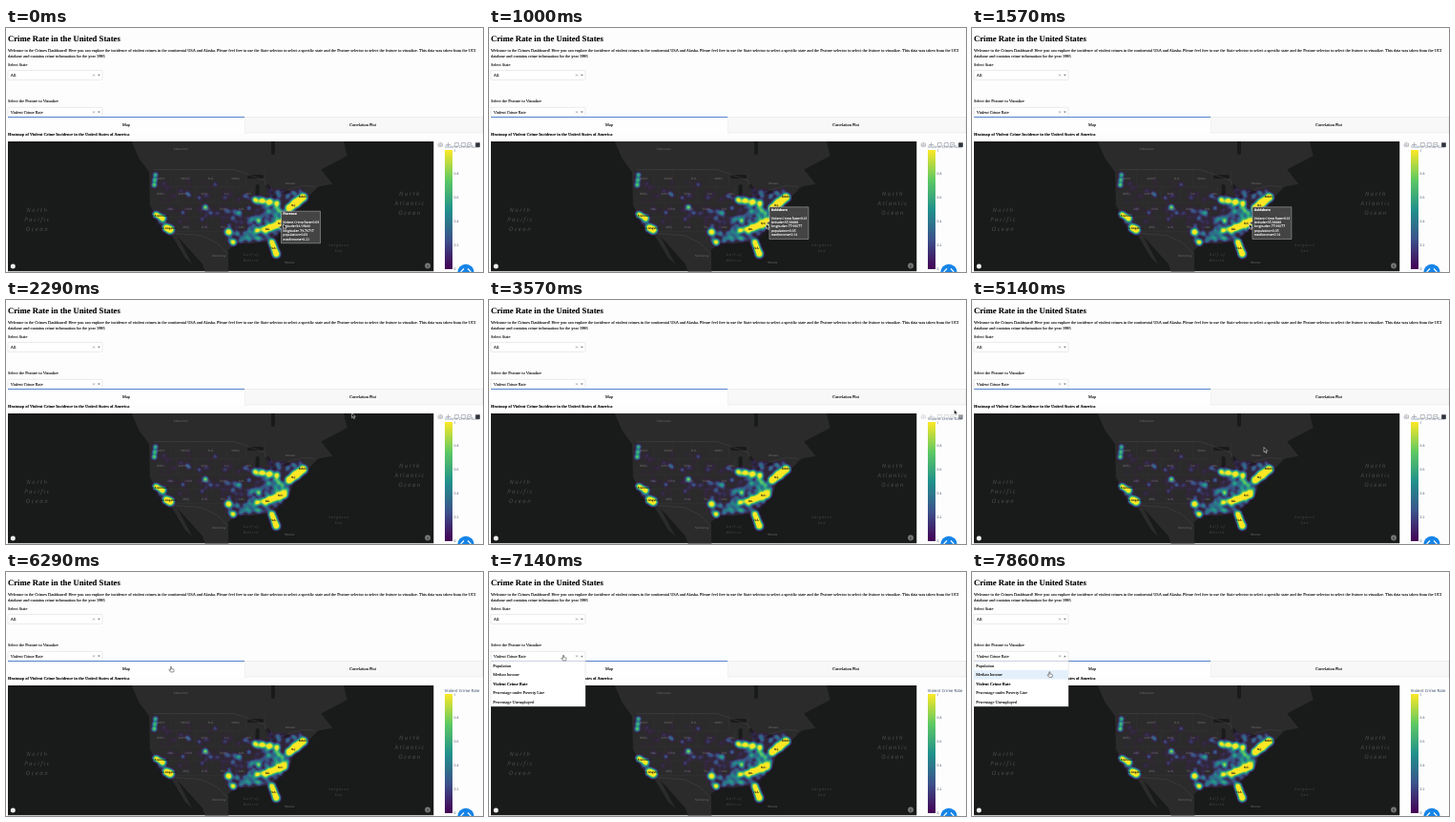
An HTML page for the animation above (8 s loop, 500 by 256 pixels).

```html
<!DOCTYPE html>
<html lang="en">
<head>
<meta charset="utf-8">
<title>Crime Rate in the United States</title>
<style>
html, body { margin: 0; width: 100%; height: 100%; overflow: hidden; background: #fdfdfd; }
svg { display: block; width: 100vw; height: 100vh; }
text { font: 4.37px "Liberation Serif", serif; fill: #000; stroke: #000; stroke-width: .08px; text-rendering: geometricPrecision; }
.b { font-weight: bold; }
.mid { text-anchor: middle; }
.plot text, .map text, .tip text { font-family: "Open Sans", sans-serif; font-size: 3.4px; stroke: none; }
.plot text { fill: #2a3f5f; }
.plot .title { font-size: 4.25px; }
.map text { font-size: 3px; fill: #777; text-anchor: middle; }
.map .sea, .map .gulf { font-style: italic; fill: #505050; }
.map .sea { font-size: 6px; letter-spacing: 1.5px; }
.map .gulf { font-size: 3.6px; letter-spacing: .9px; }
.map .hot { fill: #1a1a12; font-weight: bold; }
.tip text { fill: #fff; stroke: #fff; stroke-width: .12px; }
</style>
</head>
<body>
<svg id="stage" viewBox="0 0 500 256" preserveAspectRatio="none"></svg>
<script>
const LOOP = 8000, STEP = 1000 / 7;
const stage = document.getElementById('stage');
const mix = (a, b, u) => a + (b - a) * u;

let seed = 11;
const rnd = () => (seed = (seed * 16807) % 2147483647) / 2147483647;

// Mercator projection of the map view
const merc = lat => Math.log(Math.tan(Math.PI / 4 + lat * Math.PI / 360));
const proj = (lon, lat) => [303 + 3.03 * (lon + 74), 155 + (0.947 - merc(lat)) * 173.6];
const line = s => 'M' + s.split(' ').map(p => proj(...p.split(',').map(Number))).join('L');

const text = (x, y, s, cls = '', attr = '') => `<text x="${x}" y="${y}" class="${cls}" ${attr}>${s}</text>`;
const rect = (x, y, w, h, fill, attr = '') =>
  `<rect x="${x}" y="${y}" width="${w}" height="${h}" fill="${fill}" ${attr}/>`;
const stack = (x, y, gap, words, cls) => words.split(' ').map((s, i) => text(x, y + i * gap, s, cls)).join('');
const place = (lon, lat, s, cls) => {
  const [x, y] = proj(lon, lat);
  return text(x, y + 1, s, cls);
};
// names spread evenly along a parallel
const row = (lat, from, to, names) =>
  names.split(' ').map((s, i, all) => place(mix(from, to, i / (all.length - 1)), lat, s)).join('');

const LAND = line('-132,57 -128,51.5 -124.5,48.4 -124.2,40.3 -120.6,34.6 -117.1,32.5 -112,25 -109.6,23 -114.7,31.6 -106,23 -105,20 -97,20 -97.2,27.5 -94,29.5 -89.3,29.4 -84,30 -81,25.2 -81.4,31 -76,35.2 -74,40.5 -70,42 -66,45 -61,45.6 -65,49 -56,52 -58,57');
const LAKES = 'M255 156h13M263.6 178v-12M274 166l4 7M276 178l10-3M288 172h7M280 119v12';
const BORDER = line('-123,49 -95,49 -84.5,46.5 -82.5,42.5 -76,44.3 -71.3,45.2 -67,45') +
  line('-117.1,32.5 -106.5,31.8 -101,29.6 -97.2,26');

// a loose grid of state lines, offset from row to row
function states() {
  let d = '';
  for (let r = 0; r < 4; r++) {
    const top = 49 - r * 4, low = top - 4;
    d += line(`${-123 + r},${low} ${-92 + r * 3},${low}`);
    for (let lon = -117 + r * 2; lon < -82; lon += 6.5) d += line(`${lon},${top} ${lon},${low}`);
  }
  return d;
}

// populated corridors: two ends in lon, lat, then spots and radius
const CORRIDORS = [
  [-122.1, 37.8, -119.8, 36.7, 3, 2.8],
  [-118.5, 34.1, -117.2, 33.5, 3, 3.8],
  [-122.3, 47.8, -122.7, 45.4, 3, 1.7],
  [-105, 39.7, -105, 39.7, 1, 2.2],
  [-97, 32.8, -95.4, 29.8, 2, 3.2],
  [-87.8, 41.7, -80.3, 40.8, 4, 3],
  [-71.2, 42.3, -76, 39.5, 5, 4.2],
  [-78, 35.6, -84.5, 33.6, 5, 3.6],
  [-86.6, 36, -87, 33.3, 2, 2.3],
  [-82, 29.8, -80.5, 26.2, 4, 3.1]
];

function heat() {
  let out = '';
  const dot = (x, y, r, a) => out += `<circle cx="${x}" cy="${y}" r="${r}" opacity="${a}"/>`;
  for (let i = 0; i < 190; i++) {
    const u = rnd() ** .8, v = rnd() ** .85;
    const x = mix(228, 313 - 31 * v, u), y = 170 + (56 - 5 * u) * v;
    dot(x, y, 1.3 + rnd() * 1.3, .1 + .55 * rnd() * mix(.25, 1, (u + v) / 2));
  }
  for (let i = 0; i < 55; i++) dot(158 + rnd() * 70, 158 + rnd() * 54, 1.6, .1 + .5 * rnd() ** 4);
  for (const [lon1, lat1, lon2, lat2, n, r] of CORRIDORS)
    for (let i = 0; i < n; i++) {
      const u = i / Math.max(1, n - 1);
      dot(...proj(mix(lon1, lon2, u), mix(lat1, lat2, u)), r * (.9 + .35 * rnd()), 1);
    }
  return out;
}

const VIRIDIS = ['#440154', '#3b528b', '#21918c', '#5ec962', '#fde725'];
const channel = i => [...VIRIDIS, VIRIDIS[4]].map(c => parseInt(c.substr(1 + i * 2, 2), 16) / 255).join(' ');
const defs = `<defs>
  <filter id="viridis" filterUnits="userSpaceOnUse" x="130" y="120" width="210" height="136" color-interpolation-filters="sRGB">
    <feGaussianBlur stdDeviation="1.6"/>
    <feColorMatrix values="0 0 0 1 0  0 0 0 1 0  0 0 0 1 0  0 0 0 1 0"/>
    <feComponentTransfer>
      ${['R', 'G', 'B'].map((c, i) => `<feFunc${c} type="table" tableValues="${channel(i)}"/>`).join('')}
      <feFuncA type="table" tableValues="0 .9 1 1 1 1"/>
    </feComponentTransfer>
  </filter>
  <linearGradient id="scale" x1="0" y1="1" x2="0" y2="0">
    ${VIRIDIS.map((c, i) => `<stop offset="${i / 4}" stop-color="${c}"/>`).join('')}
  </linearGradient>
  <clipPath id="view">${rect(2, 119, 446.5, 136.5, '#000')}</clipPath>
</defs>`;

const select = (y, value) =>
  rect(2, y, 99, 10, '#fff', 'stroke="#ccc" stroke-width=".4" rx="1"') + text(4.8, y + 6.7, value) +
  `<path d="M91 ${y + 4}l2 2m0-2l-2 2" stroke="#777" stroke-width=".5"/>
   <path d="M96 ${y + 4.3}h2.8l-1.4 1.6z" fill="#777"/>`;

const page = rect(0, 0, 500, 256, '#fdfdfd') +
  text(2, 13.6, 'Crime Rate in the United States', 'b', 'style="font-size:8.68px"') +
  text(2, 25.4, 'Welcome to the Crimes Dashboard! Here you can explore the incidence of violent crimes in the continental USA and Alaska. Please feel free to use the State selector to select a specific state and the Feature selector to select the feature to visualize. This data was taken from the UCI') +
  text(2, 31.2, 'database and contains crime information for the year 1995') +
  text(2, 40, 'Select State') + select(44.5, 'All') +
  text(2, 78, 'Select the Feature to Visualize') + select(83.3, 'Violent Crime Rate') +
  rect(250, 93.6, 250, 16.4, '#f8f8f8', 'stroke="#d6d6d6" stroke-width=".4"') +
  rect(2, 93, 248, 17, '#fefefe') + rect(2, 93, 248, .9, '#4274c4') +
  text(126, 103.2, 'Map', 'mid') + text(374, 102.8, 'Correlation Plot', 'mid') +
  text(2, 113.4, 'Heatmap of Violent Crime Incidence in the United States of America', 'b');

const map = `<g class="map" clip-path="url(#view)">
  ${rect(2, 119, 446.5, 136.5, '#191a1a')}
  <path d="${LAND}Z" fill="#2b2b2b"/>
  <g fill="none"><path d="${states()}" stroke="#3a3a3a" stroke-width=".35"/>
  <path d="${LAKES}" stroke="#191a1a" stroke-width="4" stroke-linecap="round"/>
  <path d="${BORDER}" stroke="#505050" stroke-width=".4"/></g>
  <g filter="url(#viridis)">${heat()}</g>
  ${stack(33, 193, 10.2, 'North Pacific Ocean', 'sea')}
  ${stack(423.5, 175.7, 10.2, 'North Atlantic Ocean', 'sea')}
  ${text(257, 239, 'Gulf of', 'gulf') + text(257, 245, 'Mexico', 'gulf')}
  ${stack(349, 229, 6, 'Sargasso Sea', 'gulf')}
  ${row(47, -120.5, -94.5, 'WASH. MONT. N.D. MINN.')}
  ${row(43.3, -120.5, -90, 'OREG. IDAHO WYO. S.D. WIS.')}
  ${row(39.2, -117, -92.5, 'NEV. UTAH COLO. KANS. MO.')}
  ${row(34.3, -111.7, -92.5, 'ARIZ. N.M. TEX. ARK.')}
  ${place(-113.5, 53.5, 'Edmonton') + place(-75.7, 45.9, 'Ottawa') + place(-76, 23.4, 'Havana')}
  ${place(-100.3, 25.5, 'Monterrey') + place(-121.3, 37.5, 'San Francisco', 'hot') + place(-118, 33.9, 'Los Angeles', 'hot')}
  ${place(-71.3, 42.4, 'MASS.', 'hot') + place(-74.5, 40.2, 'N.J.', 'hot') + place(-79, 35.2, 'N.C.', 'hot')}
  ${place(-83.5, 33.6, 'GA.', 'hot') + place(-81.5, 28, 'FLA.', 'hot')}
  <circle cx="7.3" cy="250" r="2.5" fill="#eee"/>
  <circle cx="442" cy="249.5" r="2.9" fill="#777"/><path d="M442 248v.6m0 .7v2" stroke="#222" stroke-width=".8"/>
</g>`;

const legend = `<g class="plot">${rect(460, 128, 8, 125, 'url(#scale)')}
  ${text(459.8, 126, 'Violent Crime Rate', 'title')}
  ${[0, .2, .4, .6, .8, 1].map(v => text(469.6, 254 - v * 124.5, v)).join('')}</g>
  <circle cx="482" cy="256.3" r="8.6" fill="#1684e8"/>
  <path d="M480 252.5l-3 3 3 3m4-6l3 3-3 3" fill="none" stroke="#fff" stroke-width="1.1"/>`;

const box = x => `M${x} 120.5h4v4h-4z`;
const tools = `<g id="tools">${rect(452, 119.5, 46, 6.2, '#fff', 'opacity=".45"')}
  <g fill="none" stroke="#959aa2" stroke-width=".65">
    <path d="M453.2 121.2h1l.6-.8h1.2l.6.8h1v3h-4.4zM463.5 120v5m-2.5-2.5h5${[470.3, 477.3, 483.7].map(box).join('')}m.9 2h2.2"/>
    <circle cx="455.4" cy="122.7" r=".8"/>
  </g>${rect(492.2, 120.3, 4.6, 4.6, '#2f333b')}</g>`;

function tip(id, name, lat, lon, rate, population, income) {
  const [x, y] = proj(lon, lat);
  const rows = [name, '', `Violent Crime Rate=${rate}`, `latitude=${lat}`, `longitude=${lon}`, `population=${population}`, `medIncome=${income}`];
  return `<g id="${id}" class="tip" transform="translate(${x} ${y})">
    <path d="M0 0l3-1.6v-15.2h41v33.6h-41v-15.2z" fill="#444" stroke="#ddd" stroke-width=".4"/>
    ${rows.map((s, i) => text(4.8, -12.8 + i * 4.4, s, i ? '' : 'b')).join('')}</g>`;
}
const tips = tip('tipA', 'Florence', 34.19844, -79.76717, .69, .03, .22) +
  tip('tipB', 'Goldsboro', 35.38488, -77.99277, .61, .05, .14);

const options = ['Population', 'Median Income', 'Violent Crime Rate', 'Percentage under Poverty Line', 'Percentage Unemployed'];
const menu = `<g id="menu">${rect(2, 93.3, 99, 47.7, '#fff', 'stroke="#ccc" stroke-width=".4"')}
  <rect id="hover" x="2.2" width="98.6" height="9.5" fill="#e3f0fc"/>
  ${options.map((s, i) => text(4.3, 99.8 + i * 9.5, s, i === 2 ? 'b' : '')).join('')}
  ${rect(95.2, 87, 4, 3, '#fff')}<path d="M96 89.2h2.8l-1.4-1.6z" fill="#777"/></g>`;

const cursor = `<g id="cursor">
  <path id="arrow" d="M0 0v5.2l1.2-1.1.9 2 .9-.4-.9-1.9h1.7z" fill="#111" stroke="#fff" stroke-width=".5"/>
  <path id="hand" d="M-.5-2.6q.6-.7 1 .1v2l2.1.5q.7.2.5 1l-.5 1.9H-.6l-1.6-2.2q-.1-.7.7-.5l1 .6z" fill="#fff" stroke="#111" stroke-width=".45"/></g>`;

stage.innerHTML = defs + page + map + legend + tools + tips + menu + cursor;

const el = id => document.getElementById(id);
const show = (id, on) => el(id).setAttribute('visibility', on ? 'visible' : 'hidden');
const clamp = u => Math.min(1, Math.max(0, u));

// pointer moves: start, end, then where it arrives
const HOME = [290.5, 205.5];
const MOVES = [
  [1850, 2290, 362.5, 118.5],
  [2500, 3570, 487.5, 115],
  [3750, 5140, 306, 154.5],
  [5800, 6290, 173, 102],
  [6400, 7000, 78, 90],
  [7350, 7860, 81.3, 107.5]
];
function pointer(t) {
  let [x, y] = HOME;
  for (const [from, to, tx, ty] of MOVES) {
    const u = clamp((t - from) / (to - from)), e = u * u * (3 - 2 * u);
    x = mix(x, tx, e);
    y = mix(y, ty, e);
  }
  return [x, y];
}

function draw(time) {
  const t = Math.floor(((time % LOOP) + 4) / STEP) * STEP;
  const [x, y] = pointer(t);
  const hand = t > 6100, open = t > 7130;
  el('cursor').setAttribute('transform', `translate(${x} ${y})`);
  show('arrow', !hand);
  show('hand', hand);
  // the toolbar fades while the pointer is off the plot
  const dip = clamp(Math.abs(t - 3710) / 280), leave = clamp((6140 - t) / 280);
  el('tools').setAttribute('opacity', Math.min(dip, leave));
  show('tipA', t < 560);
  show('tipB', t > 560 && t < 1990);
  show('menu', open);
  el('hover').setAttribute('y', 93.5 + 9.5 * Math.max(0, Math.floor((y - 93.3) / 9.5)));
  show('hover', open && y > 93.3);
}

const start = performance.now();
function tick() {
  draw(performance.now() - start);
  requestAnimationFrame(tick);
}
draw(0);
tick();
</script>
</body>
</html>
```
